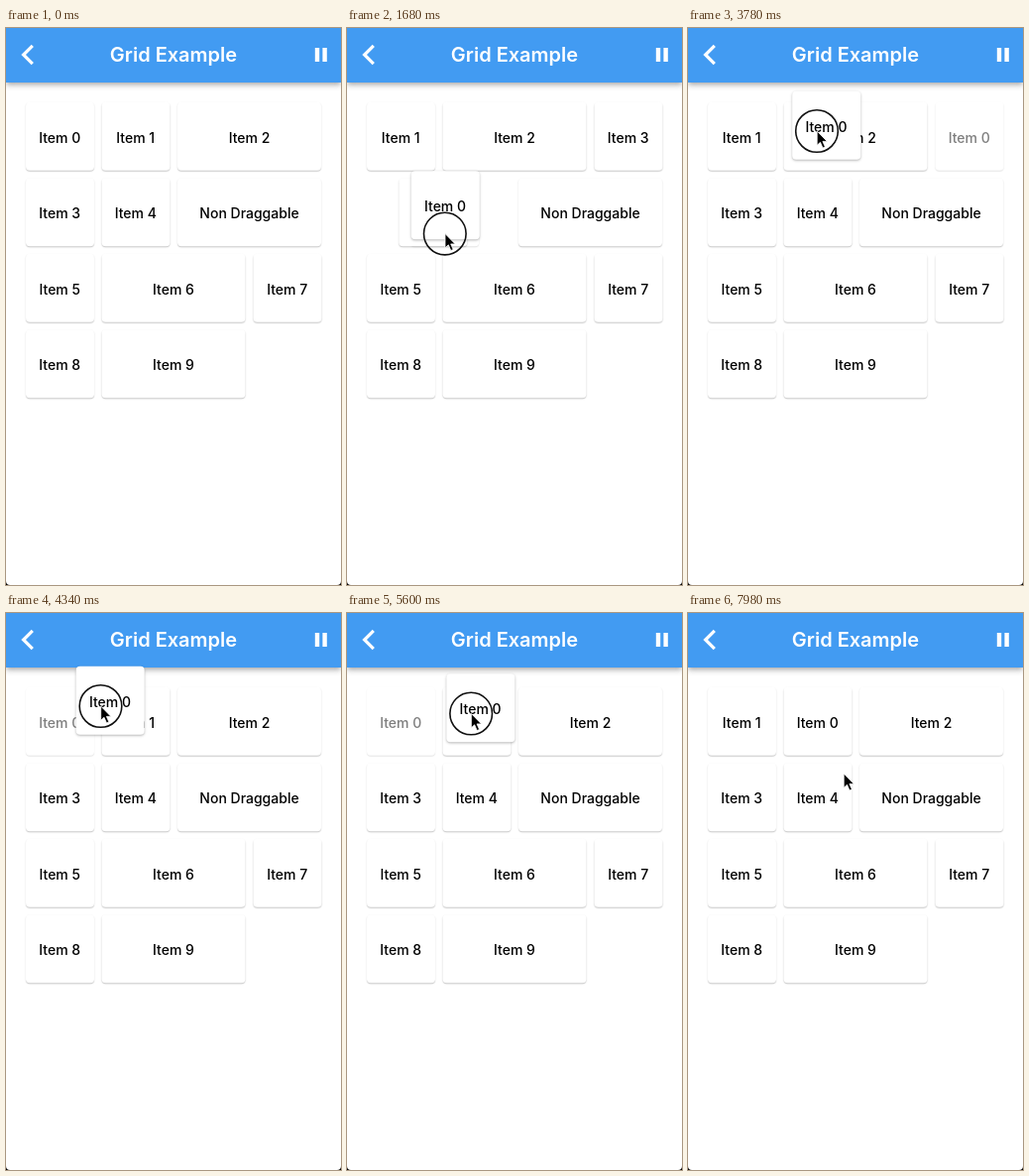
An HTML page for the animation above (8000 ms loop, 338 px wide and 562 px high).

```html
<!DOCTYPE html>
<html lang="en">
<head>
<meta charset="utf-8">
<title>Grid Example</title>
<style>
html, body { margin: 0; width: 100%; height: 100%; overflow: hidden; background: #000; }
#stage {
  position: relative; width: 338px; height: 562px; overflow: hidden;
  background: #fff; border-radius: 0 0 4px 4px;
  font: 450 14px/72px Inter, Roboto, sans-serif; color: #000;
}
header {
  position: absolute; inset: 0 0 auto; height: 55px; z-index: 2;
  background: #429bf2; color: #fff; text-align: center;
  font-size: 20px; font-weight: 600; line-height: 54px;
  box-shadow: 0 2px 4px -1px rgba(0, 0, 0, .2), 0 4px 5px rgba(0, 0, 0, .12), 0 1px 8px rgba(0, 0, 0, .1);
}
header svg { position: absolute; left: 0; top: 0; }
.card {
  position: absolute; left: 0; top: 0; height: 68.5px; z-index: 1;
  background: #fff; border-radius: 4px; text-align: center; white-space: nowrap;
  box-shadow: 0 1px 1.3px rgba(0, 0, 0, .23);
}
#held { z-index: 3; box-shadow: 0 1px 2.5px rgba(0, 0, 0, .3); }
#pointer { position: absolute; left: -30px; top: -30px; z-index: 4; }
</style>
</head>
<body>
<div id="stage">
  <header>Grid Example
    <svg width="338" height="55">
      <path d="M26.8 17.8 17.6 27 26.8 36.2" fill="none" stroke="#fff" stroke-width="3.2"/>
      <path d="M311.8 20h4.4v14h-4.4zM319.4 20h4.4v14h-4.4z" fill="#fff"/>
    </svg>
  </header>
  <svg id="pointer" width="60" height="60">
    <circle id="ring" cx="30" cy="30" r="21.3" fill="none" stroke="#111" stroke-width="1.6"/>
    <path d="M30.2 30v14.3l3.3-3 2.5 5.7 2.4-1-2.5-5.6h4.5z" fill="#000" stroke="#fff" stroke-width=".8"/>
  </svg>
</div>
<script>
const LOOP = 8000, TICK = 70, REFLOW = 200;
const CELL = 68.5, STEP = 76.5, LEFT = 20, TOP = 74.7;

// Pointer rests between strokes: start, end, target x, target y
const entry = [149, 443];
const strokes = [
  [140, 280, 134, 220], [420, 980, 54, 138],
  [1050, 1400, 54, 169], [1400, 1750, 104, 212],
  [1820, 1960, 84, 200], [1960, 2520, 123, 191],
  [2730, 3290, 130, 104], [3780, 4130, 78, 97], [4130, 4550, 113, 91],
  [4830, 5390, 113, 101], [5460, 5880, 160, 103], [5950, 6440, 113, 98],
  [6440, 6930, 123, 113], [7210, 7910, 157, 162]
];
// Press and release; the card lifts one tick after the press
const presses = [[980, 1820], [2380, 7210]];
// When the dragged item takes a new place in the order
const places = [[1330, 3], [1610, 4], [2870, 2], [4130, 0], [5600, 2], [6300, 1]];

const stage = document.getElementById("stage");
const pointer = document.getElementById("pointer");
const ring = document.getElementById("ring");

const clamp = k => Math.max(0, Math.min(1, k));
const smooth = k => k * k * (3 - 2 * k);
const easeOut = k => 1 - (1 - k) ** 2;
const mix = (a, b, k) => a.map((v, i) => v + (b[i] - v) * k);
const move = (el, [x, y]) => { el.style.transform = `translate(${x}px, ${y}px)`; };
const show = (el, on) => { el.style.visibility = on ? "visible" : "hidden"; };
const cellPos = n => [LEFT + (n % 4) * STEP, TOP + Math.floor(n / 4) * STEP];

function card(label, span, cell) {
  const el = document.createElement("div");
  el.className = "card";
  el.textContent = label;
  el.style.width = CELL + (span - 1) * STEP + "px";
  move(el, cellPos(cell));
  stage.append(el);
  return el;
}

const items = [0, 1, 2, 3, 4].map(i => card("Item " + i, i === 2 ? 2 : 1, 0));
card("Non Draggable", 2, 6);
card("Item 5", 1, 8);
card("Item 6", 2, 9);
card("Item 7", 1, 11);
card("Item 8", 1, 12);
card("Item 9", 2, 13);
const held = card("Item 0", 1, 0);
held.id = "held";

// Cell of an item when item 0 stands at the given place; item 2 fills two cells
function slot(item, place) {
  const order = [1, 2, 3, 4];
  order.splice(place, 0, 0);
  const n = order.indexOf(item);
  return cellPos(n + (order.indexOf(2) < n ? 1 : 0));
}

function itemPos(item, t) {
  return places.reduce(
    (pos, [start, place]) => mix(pos, slot(item, place), easeOut(clamp((t - start) / REFLOW))),
    slot(item, 0));
}

function tipPos(t) {
  return strokes.reduce(
    (pos, [start, end, x, y]) => mix(pos, [x, y], smooth(clamp((t - start) / (end - start)))),
    entry);
}

function draw(t) {
  const tip = tipPos(t), seen = t >= strokes[0][0];
  const press = presses.find(([down, up]) => t >= down && t < up);
  const lift = press && press[0] + TICK, dragging = press && t >= lift;
  move(pointer, tip);
  show(pointer, seen);
  show(ring, press);
  items.forEach((el, i) => move(el, itemPos(i, t)));
  items[0].style.opacity = dragging ? .5 : 1;
  items[0].style.zIndex = dragging ? 0 : 1;
  show(held, dragging);
  if (dragging) {
    const from = tipPos(lift), base = itemPos(0, lift);
    move(held, base.map((v, i) => v + tip[i] - from[i]));
  }
}

const begin = performance.now();
function frame() {
  const t = (performance.now() - begin) % LOOP;
  draw(Math.floor(t / TICK) * TICK);
  requestAnimationFrame(frame);
}
frame();
</script>
</body>
</html>
```
